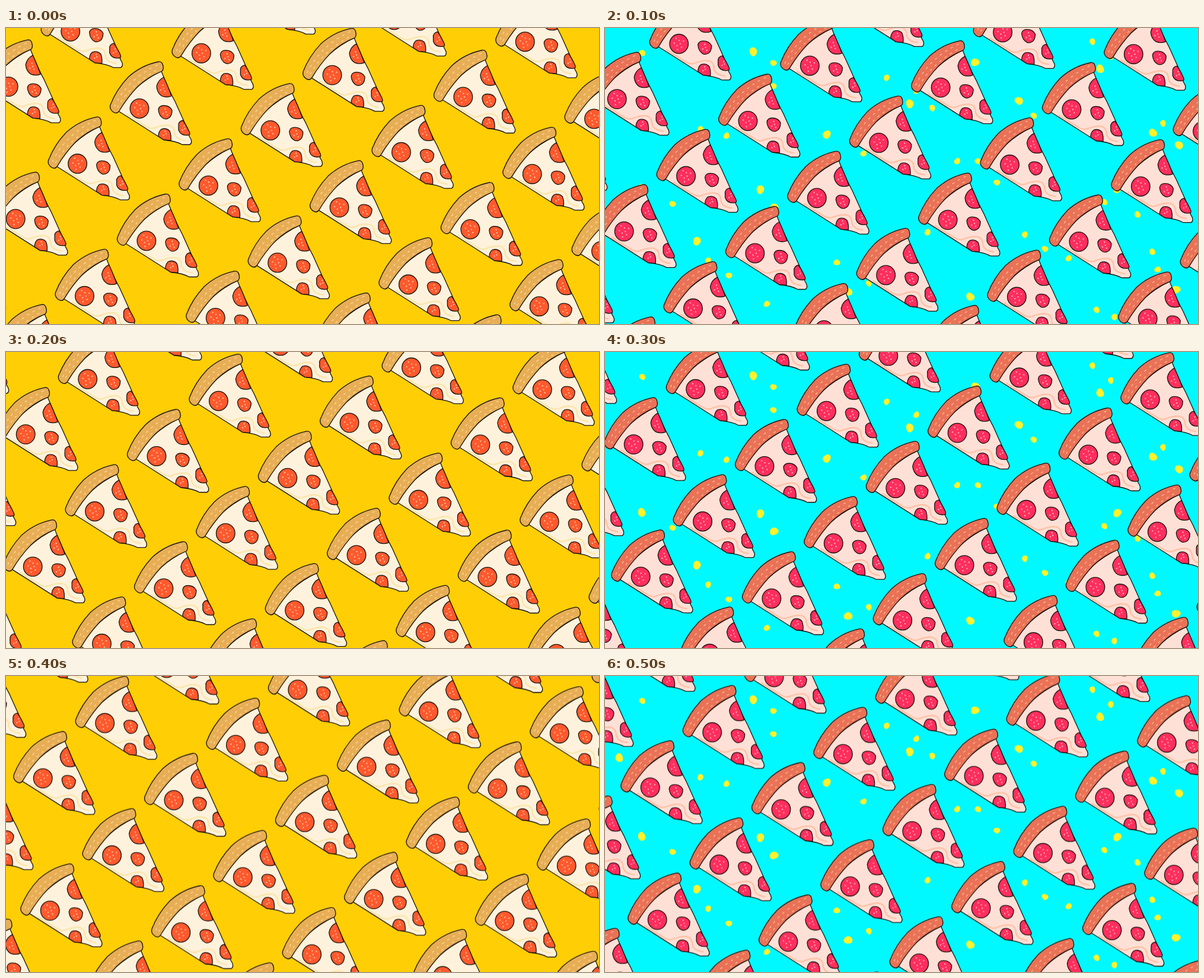
Animation of 1000x500 px, one loop 600 ms. Source, as an HTML page:

```html
<!DOCTYPE html>
<html lang="en">
<head>
<meta charset="utf-8">
<title>Pizza pattern</title>
<style>
  html, body { margin: 0; width: 100%; height: 100%; overflow: hidden; }
  svg { display: block; width: 100%; height: 100%; }
  .warm {
    --bg: #ffce05; --crust: #e8ae55; --seed: #f8d795; --cheese: #fff2dc;
    --melt: #fbe6ac; --meat: #ff592d; --speck: #ffb994;
  }
  .cool {
    --bg: #00f9ff; --crust: #e97257; --seed: #ffb58f; --cheese: #ffe0d7;
    --melt: #ffc3a6; --meat: #ff2e5d; --speck: #ffa3b4;
  }
  .bg { fill: var(--bg); }
  .dots { fill: #fff22d; }
  .ink { stroke: #15100c; stroke-width: 1.3; stroke-linejoin: round; }
  .crust { fill: var(--crust); }
  .cheese { fill: var(--cheese); }
  .meat { fill: var(--meat); }
  .line { fill: none; stroke-linecap: round; }
  .melt { stroke: var(--melt); stroke-width: 2.6; stroke-linejoin: round; }
  .seed { stroke: var(--seed); stroke-width: 1.5; }
  .speck { fill: var(--speck); }
</style>
</head>
<body>
<svg viewBox="0 0 1000 500" preserveAspectRatio="none">
  <defs>
    <g id="slice">
      <path class="ink cheese" d="M262 73Q274 104 285 124L303 164Q309 174 309 183Q316 193 310 197L297 197Q287 191 266 189L208 152L189 140Q214 96 262 73Z"/>
      <path class="line melt" d="M204 146L236 166Q246 172 253 168Q284 157 284 178Q286 188 302 190"/>
      <path class="ink crust" d="M257 57Q264 56 265 65Q266 70 263 73Q240 82 222 99Q204 118 191 140Q187 146 181 142Q174 137 176 130Q186 104 206 83Q228 63 257 57Z"/>
      <path class="line seed" stroke-dasharray="3 8" d="M183 132Q204 87 256 62M188 134Q210 95 258 69"/>
      <g class="ink meat">
        <ellipse cx="225" cy="136" rx="15.8" ry="16.3"/>
        <path d="M257 138Q258 131 266 131Q276 131 280 139Q280 147 276 151Q271 155 266 153Q258 149 257 138Z"/>
        <path d="M266 83Q256 88 254 99Q255 110 263 115Q271 118 279 115Q274 100 266 83Z"/>
        <path d="M291 166Q290 158 298 156Q303 162 309 175Q312 181 306 181Q294 182 291 172Z"/>
        <path d="M257 183Q257 175 262 171Q270 168 276 174Q279 181 278 190L266 189Z"/>
      </g>
    </g>
  </defs>
</svg>
<script>
const svg = document.querySelector('svg');
const STEP = 100;
const drift = [[0, 0], [16, 21], [29, 40], [44, 57], [58, 73.7], [72, 89.3]];
const across = [220.75, 36.9];
const down = [-104.4, 93.3];

// Confetti centres as "x,y", grouped by size.
const bigDots = [[250,40], [24,138], [374,180], [62,271], [262,273], [285,303], [155,360],
  [410,446], [514,128], [624,58], [698,123], [616,454], [835,69], [924,177], [968,198],
  [864,272], [963,442]];
const smallDots = [[63,42], [284,98], [161,171], [205,182], [436,212], [209,418], [391,396],
  [475,84], [525,106], [629,225], [661,261], [544,345], [723,148], [708,349], [742,373],
  [782,389], [822,23], [842,294], [923,378], [932,408], [829,476], [859,488], [898,315],
  [853,48], [284,59], [114,297], [174,393], [273,466], [445,431], [552,135], [594,225],
  [941,161]];

function add(parent, tag, attrs) {
  const node = document.createElementNS('http://www.w3.org/2000/svg', tag);
  for (const key in attrs) node.setAttribute(key, attrs[key]);
  return parent.appendChild(node);
}

// Slightly uneven round blob.
function blob([x, y], r) {
  const points = [];
  for (let i = 0; i < 10; i++) {
    const a = i * Math.PI / 5;
    const reach = r * (1 + 0.1 * Math.sin(2 * a + x) + 0.06 * Math.sin(3 * a + y));
    points.push((x + reach * Math.cos(a)).toFixed(1) + ' ' + (y + reach * Math.sin(a)).toFixed(1));
  }
  return 'M' + points.join('L') + 'Z';
}

function addConfetti(scene) {
  const d = bigDots.map(p => blob(p, 7)).join('') + smallDots.map(p => blob(p, 5.3)).join('');
  add(scene, 'path', { class: 'dots', d });
}

// Fat specks spread over a pepperoni in a sunflower spiral.
function addSpecks(x, y, reach, count) {
  for (let k = 0; k < count; k++) {
    const r = reach * Math.sqrt((k + 0.3) / count);
    add(document.getElementById('slice'), 'circle', {
      class: 'speck', r: 1.25,
      cx: (x + r * Math.cos(2.4 * k)).toFixed(1),
      cy: (y + r * Math.sin(2.4 * k)).toFixed(1)
    });
  }
}

// The slice art sits around (245, 127); keep only lattice places that can be seen.
function addSlices(scene) {
  const group = add(scene, 'g', {});
  for (let i = -6; i <= 8; i++) {
    for (let j = -8; j <= 8; j++) {
      const x = i * across[0] + j * down[0];
      const y = i * across[1] + j * down[1];
      if (x > -400 && x < 840 && y > -300 && y < 460)
        add(group, 'use', { href: '#slice', x: x.toFixed(1), y: y.toFixed(1) });
    }
  }
  return group;
}

function play(node, frames) {
  const steps = frames.map((frame, i) => ({ ...frame, offset: i / frames.length, easing: 'step-end' }));
  steps.push({ ...frames[0], offset: 1 });
  node.animate(steps, { duration: STEP * frames.length, iterations: Infinity });
}

addSpecks(225, 136, 11, 8);
addSpecks(268, 142, 7, 4);
addSpecks(264, 102, 7, 4);
addSpecks(300, 170, 5, 3);
addSpecks(268, 179, 5, 3);

for (const name of ['warm', 'cool']) {
  const scene = add(svg, 'g', { class: name });
  add(scene, 'rect', { class: 'bg', width: 1000, height: 500 });
  if (name === 'cool') {
    addConfetti(scene);
    play(scene, drift.map((_, i) => ({ opacity: i % 2 })));
  }
  play(addSlices(scene), drift.map(([x, y]) => ({ transform: `translate(${x}px, ${y}px)` })));
}
</script>
</body>
</html>
```
